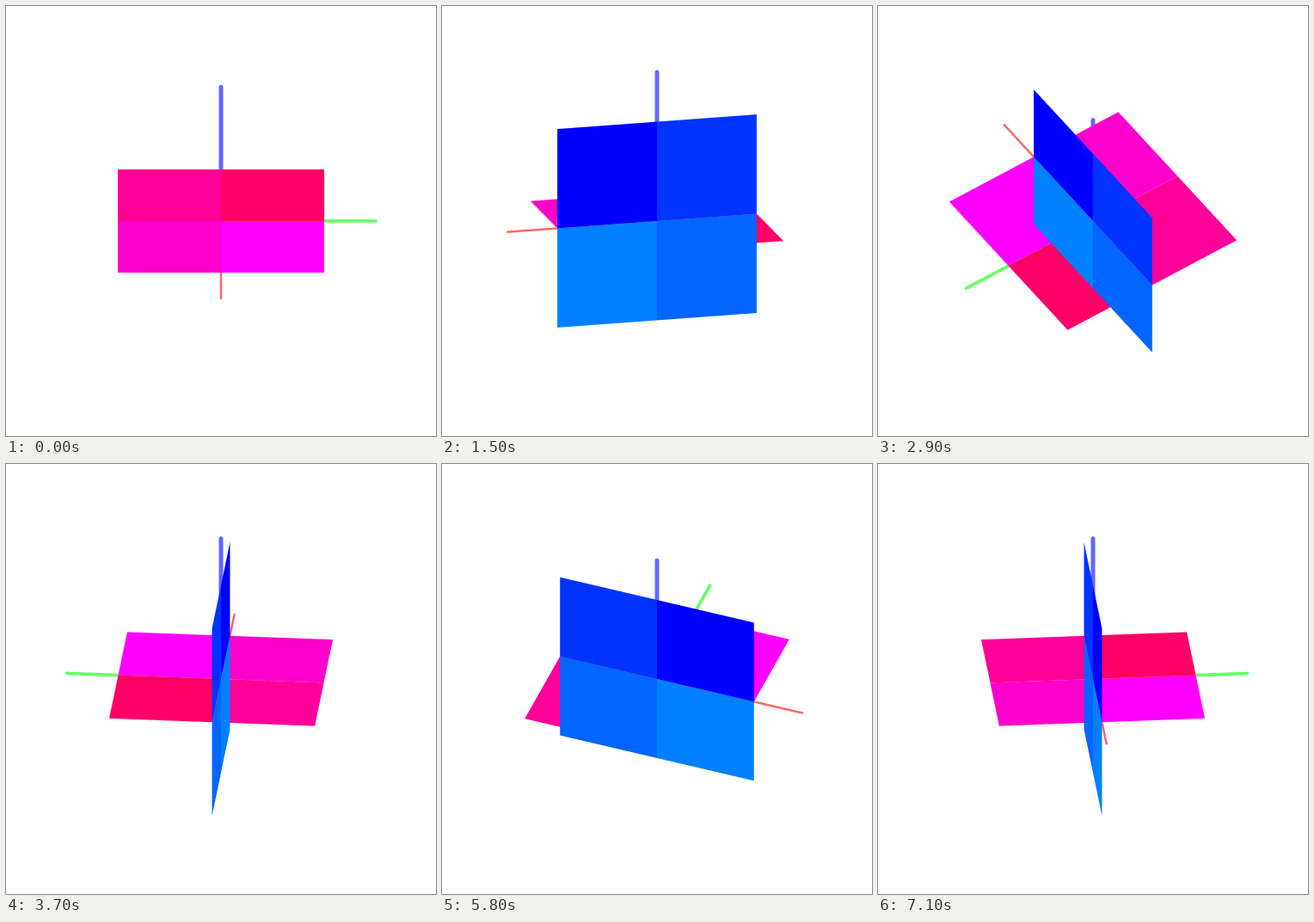
These frames come from a looping animation (500x500 px, 7200 ms). A matplotlib script:

```python
import numpy as np
import matplotlib.pyplot as plt
from matplotlib.animation import FuncAnimation
from matplotlib.patches import Polygon

FRAMES = 72
INTERVAL = 100
CENTER = 250
UNIT = 120          # pixels per world unit
AXIS_LENGTH = 1.5

# Quadrant signs (first and second plane direction) and their colours
FLOOR = [(1, 1, "#ff00ff"), (1, -1, "#ff00cc"),
         (-1, -1, "#ff0099"), (-1, 1, "#ff0066")]
WALL = [(1, 1, "#0000ff"), (-1, 1, "#0033ff"),
        (-1, -1, "#0066ff"), (1, -1, "#0080ff")]
# Line width in pixels and colour of the x, y and z axes
AXES = [(2.5, "#ff6666"), (3.75, "#66ff66"), (5, "#6666ff")]

X, Y, Z = np.eye(3)


def project(points, azimuth, elevation):
    """Orthographic view of world points, in stage pixels."""
    x, y, z = np.asarray(points, float).T
    right = y * np.cos(azimuth) - x * np.sin(azimuth)
    toward = x * np.cos(azimuth) + y * np.sin(azimuth)
    up = z * np.cos(elevation) - toward * np.sin(elevation)
    return CENTER + UNIT * np.column_stack([right, up])


def quadrant(u, v):
    return [0 * u, u, u + v, v]


fig = plt.figure(figsize=(5, 5), dpi=100, facecolor="white")
ax = fig.add_axes([0, 0, 1, 1])
ax.set_xlim(0, 500)
ax.set_ylim(0, 500)
ax.axis("off")

# The axes lie under the floor, and the wall covers both
lines = []
for direction, (width, color) in zip((X, Y, Z), AXES):
    line, = ax.plot([], [], color=color, lw=width * 72 / fig.dpi,
                    solid_capstyle="round", snap=False, zorder=1)
    lines.append((line, [0 * direction, AXIS_LENGTH * direction]))

faces = []
for plane, second, zorder in ((FLOOR, Y, 2), (WALL, Z, 3)):
    for a, b, color in plane:
        patch = Polygon(np.zeros((4, 2)), facecolor=color, edgecolor="none",
                        linewidth=0, snap=False, zorder=zorder)
        ax.add_patch(patch)
        faces.append((patch, quadrant(a * X, b * second)))


def draw(frame):
    azimuth = 2 * np.pi * frame / FRAMES
    elevation = np.radians(30 + 20 * np.sin(3 * azimuth))
    for line, points in lines:
        line.set_data(*project(points, azimuth, elevation).T)
    for patch, points in faces:
        patch.set_xy(project(points, azimuth, elevation))
    return [item for item, _ in lines + faces]


anim = FuncAnimation(fig, draw, frames=FRAMES, interval=INTERVAL,
                     repeat=True, repeat_delay=0)
plt.show()
```
